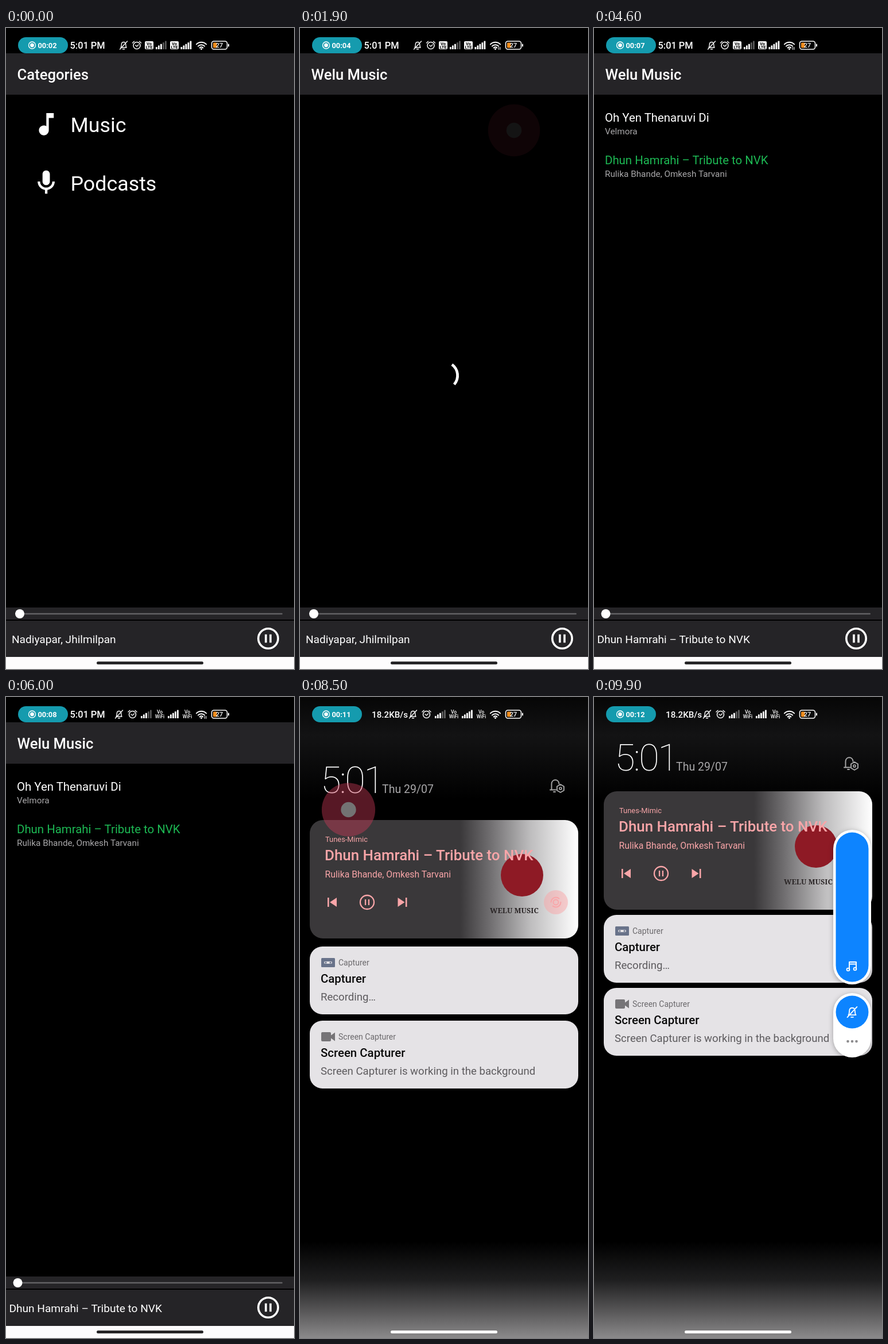
An HTML page that plays this animation: 502x1115 px, repeating every 10000 ms.

```html
<!DOCTYPE html>
<html lang="en">
<head>
<meta charset="utf-8">
<title>Music player</title>
<style>
  html, body { margin: 0; width: 100%; height: 100%; overflow: hidden; background: #000; }
  svg { display: block; width: 502px; height: 1115px; font-family: Roboto, sans-serif; fill: #fff; }
  .line { fill: none; stroke: #fff; stroke-linecap: round; stroke-linejoin: round; }
  .medium { font-weight: 500; }
  .bar { fill: #252427; }
  .title { font-size: 20.4px; }
  .sub { font-size: 15.3px; fill: #a9a8aa; }
  .pink { fill: #f9a5a8; }
  .pink .line { stroke: #f9a5a8; }
  .small { font-size: 14px; fill: #6b696c; }
  .body { font-size: 18.6px; fill: #5d5b5e; }
  #volume { filter: drop-shadow(0 2px 4px rgba(0, 0, 0, .3)); }
</style>
</head>
<body>
<svg id="stage" viewBox="0 0 502 1115"></svg>
<script>
const LOOP = 10000, STEP = 100;
const SONG = 'Dhun Hamrahi – Tribute to NVK';
const ARTISTS = 'Rulika Bhande, Omkesh Tarvani';
const LABEL = 'Welu Music';

// Markup helpers
const text = (x, y, str, attrs = '') => `<text x="${x}" y="${y}" ${attrs}>${str}</text>`;
const rect = (x, y, w, h, attrs = '') => `<rect x="${x}" y="${y}" width="${w}" height="${h}" ${attrs}/>`;
const dot = (x, y, r, attrs = '') => `<circle cx="${x}" cy="${y}" r="${r}" ${attrs}/>`;
const line = (d, width, attrs = '') => `<path class="line" d="${d}" stroke-width="${width}" ${attrs}/>`;
const group = (id, inner, attrs = '') => `<g id="${id}" ${attrs}>${inner}</g>`;
const at = (x, y, inner, scale = 1) => `<g transform="translate(${x} ${y}) scale(${scale})">${inner}</g>`;

// Icons, centred on their own origin
const BELL = 'M-5 4H5C3.6 2.6 4 0 3.6-2.5C3-6.6-3-6.6-3.6-2.5C-4 0-3.6 2.6-5 4M-1.5 6.8H1.5';
const bellOff = line(BELL + 'M-6.5 7L6.5-7', 1.4);
const alarm = dot(0, 0.5, 6, 'class="line" stroke-width="1.5"') +
  line('M-2.5 0L0 2L3-1M-7.5-4L-4.5-6.8M7.5-4L4.5-6.8', 1.4);
const signal = lit => [0, 1, 2, 3, 4].map(i =>
  rect(i * 4, 9 - i * 2.6, 2.8, 4 + i * 2.6, i < lit ? '' : 'opacity=".35"')).join('');
const volte = rect(0, 0, 15, 14, 'rx="2"') +
  `<g fill="#000" font-size="7.5" font-weight="700" text-anchor="middle">${text(7.5, 6.8, 'Vo')}${text(7.5, 13, 'LTE')}</g>`;
const vowifi = `<g font-size="8.5" class="medium" text-anchor="middle">${text(9, 6, 'Vo')}${text(9, 14, 'WiFi')}</g>`;
const wifi = line('M-8.6-8.6A12.2 12.2 0 0 1 8.6-8.6M-5.6-5.4A8 8 0 0 1 5.6-5.4M-2.8-2.5A4 4 0 0 1 2.8-2.5', 2) + dot(0, -0.6, 1.5);
const pause = (r, w) => dot(0, 0, r, `class="line" stroke-width="${w}"`) +
  rect(-r * .34, -r * .42, w, r * .84) + rect(r * .34 - w, -r * .42, w, r * .84);
const skip = '<path d="M-8-8h2.6V8H-8zM8-8V8L-4 0z"/>';

const NOTE = 'M12 3v10.55c-.59-.34-1.27-.55-2-.55-2.21 0-4 1.79-4 4s1.79 4 4 4 4-1.79 4-4V7h4V3z';
const MIC = 'M12 14c1.66 0 3-1.34 3-3V5c0-1.66-1.34-3-3-3S9 3.34 9 5v6c0 1.66 1.34 3 3 3zm5-3c0 2.76-2.24 5-5 5s-5-2.24-5-5H5c0 3.53 2.61 6.43 6 6.92V21h2v-3.08c3.39-.49 6-3.39 6-6.92h-2z';

const songRow = (y, title, artist, id) =>
  text(19, y, title, `class="title" id="${id}"`) + text(19, y + 22, artist, 'class="sub"');

const app =
  rect(0, 0, 502, 1115, 'fill="#000"') + rect(0, 44, 502, 72, 'class="bar"') +
  text(19.6, 90, '', 'id="heading" class="medium" font-size="25.6"') +
  group('categories',
    at(44.5, 141.5, `<path d="${NOTE}"/>`, 2.15) + text(112.5, 181, 'Music') +
    at(44.5, 243.5, `<path d="${MIC}"/>`, 2.13) + text(112.5, 283, 'Podcasts'), 'font-size="35.8"') +
  group('labels', text(19.6, 181, LABEL), 'font-size="35.8"') +
  group('songs', songRow(163, 'Oh Yen Thenaruvi Di', 'Velmora', 'first') + songRow(237, SONG, ARTISTS, 'second')) +
  '<path id="spinner" class="line" style="stroke-linecap:butt" stroke-width="4.8"/>' +
  rect(0, 1008, 502, 21, 'class="bar"') + rect(0, 1031, 502, 63, 'class="bar"') +
  rect(24, 1017.7, 458, 2.6, 'rx="1.3" fill="#626164"') + dot(24, 1019, 8, 'id="knob"') +
  text(0, 1070, '', 'id="playing" font-size="19.1"') + at(457, 1062, pause(17.2, 3.6)) +
  rect(0, 1094, 502, 21, 'fill="#fdfcfd"');

const mediaCard =
  rect(17, 0, 468, 206, 'rx="23" fill="url(#cover)"') +
  dot(387, 96, 37, 'fill="#8e1a25"') +
  text(331, 162, LABEL.toUpperCase(), 'fill="#2b2627" font-family="Noto Serif, serif" font-weight="600" font-size="12.6"') +
  `<g class="pink">${dot(446, 143, 21, 'opacity=".5"')}
    ${dot(446, 143, 8.5, 'class="line" stroke-width="2" stroke-dasharray="19 7.7"')}
    ${dot(446, 143, 4.5, 'class="line" stroke-width="1.8"')}
    ${text(44, 38, 'Tunes-Mimic', 'font-size="12.9"')}
    ${text(43, 70, SONG, 'class="medium" font-size="25.9"')}
    ${text(43.5, 100, ARTISTS, 'font-size="15.8"')}
    ${at(56, 143, skip)}${at(117, 143, pause(12, 2.3))}${at(178.5, 143, `<g transform="scale(-1 1)">${skip}</g>`)}</g>`;

const noticeCard = (icon, name, body) =>
  rect(17, 0, 468, 118, 'rx="22" fill="#e5e3e6"') + icon +
  text(67, 33, name, 'class="small"') +
  text(36, 63, name, 'class="title medium" style="fill:#0a0a0a"') + text(36, 94, body, 'class="body"');
const cassette = rect(37, 20, 24, 16, 'rx="1.5" fill="#69738a"') +
  '<path d="M44 28h10" stroke="#e5e3e6" stroke-width="4" stroke-linecap="round"/>' +
  dot(45, 28, 1.6, 'fill="#69738a"') + dot(53, 28, 1.6, 'fill="#69738a"');
const camera = '<path fill="#767477" d="M39 20h13q2 0 2 2v3.5l7-5v15l-7-5v3.5q0 2-2 2h-13q-2 0-2-2v-12q0-2 2-2z"/>';

const shadeHeader =
  text(36, 0, '5:01', 'font-size="65" font-weight="200" letter-spacing="-2.5"') +
  text(143, 0, 'Thu 29/07', 'font-size="19.5" fill="#a9a8aa"') +
  `<g opacity=".65">${at(445, -13, line('M-9 7.5H1M-6.5 7.5V-3C-6-12 6-12 6.5-3M-3 11H0', 1.9))}
   ${at(454, -8, line('M0-7L6-3.5V3.5L0 7L-6 3.5V-3.5Z', 1.9) + dot(0, 0, 2, 'class="line" stroke-width="1.7"'))}</g>`;

const volume =
  rect(417, 231, 66, 269, 'rx="33"') + rect(421.5, 235.5, 57, 260, 'rx="28.5" fill="#0d84ff"') +
  at(450, 468, line('M-5 6V-7H7V4.5M-5-3.5H7', 1.9) +
    dot(-7, 6, 2.4, 'class="line" stroke-width="1.8"') + dot(5, 5, 2.4, 'class="line" stroke-width="1.8"')) +
  rect(417, 515, 66, 112, 'rx="33"') + dot(450, 548, 28.5, 'fill="#0d84ff"') + at(450, 548, bellOff, 1.3) +
  [442.5, 450, 457.5].map(x => dot(x, 599, 2.3, 'fill="#8d8c8e"')).join('');

const status =
  rect(21, 16, 87, 28, 'rx="14" fill="#159bae"') +
  dot(45.5, 30, 6, 'class="line" stroke-width="1.4"') + dot(45.5, 30, 3.4) +
  text(55.5, 34.7, '', 'id="timer" font-weight="700" font-size="12.8"') +
  text(111.5, 35.7, '5:01 PM', 'id="clock" class="medium" font-size="16.4"') +
  text(125, 35.5, '18.2KB/s', 'id="speed" class="medium" font-size="15.2"') +
  group('lte', at(205, 30, bellOff) + at(228, 30, alarm) + at(242, 23, volte) +
    at(261, 24, signal(3)) + at(286, 23, volte) + at(304.5, 24, signal(5))) +
  group('calling', at(197, 30, bellOff) + at(220.5, 30, alarm) + at(235, 24, signal(3)) +
    at(259, 23, vowifi) + at(282, 24, signal(5)) + at(307, 23, vowifi)) +
  at(340.5, 37, wifi) + line('M346.5 33.5v4M349 33.5v4', 1, 'id="traffic"') +
  rect(358.5, 23, 27, 14, 'rx="4" class="line" stroke-width="1.6"') + rect(387, 27.5, 2, 5, 'rx="1"') +
  rect(361, 25.5, 6.5, 9, 'rx="1" fill="#f08c1c"') +
  text(371.8, 34, '27', 'class="medium" font-size="11.3" text-anchor="middle"');

document.getElementById('stage').innerHTML = `
  <defs>
    <linearGradient id="cover">
      <stop offset=".56" stop-color="#3a383a"/><stop offset=".67" stop-color="#6f6d6f"/>
      <stop offset=".82" stop-color="#bdbcbd"/><stop offset="1" stop-color="#fff"/>
    </linearGradient>
    <linearGradient id="dusk" x2="0" y2="1">
      <stop offset="0" stop-color="#060606"/><stop offset=".06" stop-color="#131314"/>
      <stop offset=".16" stop-color="#000"/><stop offset=".85" stop-color="#000"/>
      <stop offset=".91" stop-color="#1f1f20"/><stop offset=".96" stop-color="#5a595a"/>
      <stop offset="1" stop-color="#8b8a8b"/>
    </linearGradient>
  </defs>` +
  app + group('shade', rect(0, 0, 502, 1115, 'fill="url(#dusk)"')) +
  rect(158, 1102, 186, 5, 'rx="2.5" id="handle"') +
  group('header', shadeHeader) + group('media', mediaCard) +
  group('notice', noticeCard(cassette, 'Capturer', 'Recording…')) +
  group('capture', noticeCard(camera, 'Screen Capturer', 'Screen Capturer is working in the background')) +
  group('volume', volume) + group('status', status) +
  group('touch', '<circle id="halo" fill="#cb3a57" opacity=".95"/>' + dot(0, 0, 13.2));

const el = {};
document.querySelectorAll('[id]').forEach(node => el[node.id] = node);
const set = (id, attrs) => Object.entries(attrs).forEach(([k, v]) => el[id].setAttribute(k, v));
const fade = (id, opacity) => set(id, { opacity, display: opacity > 0 ? 'inline' : 'none' });
const write = (id, str) => { if (el[id].textContent !== str) el[id].textContent = str; };

// Linear interpolation in a list of [time, value]
function track(t, keys) {
  const i = keys.findIndex(k => k[0] > t);
  if (i < 0) return keys[keys.length - 1][1];
  if (i === 0) return keys[0][1];
  const [t0, v0] = keys[i - 1], [t1, v1] = keys[i];
  return v0 + (v1 - v0) * (t - t0) / (t1 - t0);
}

const TAPS = [
  { down: 100, up: 300, x: 367, y: 172 },
  { down: 1250, up: 1440, x: 373, y: 178 },
  { down: 3200, up: 3300, x: 266, y: 235 },
  { down: 7700, up: 8225,
    x: [[7700, 58], [7900, 62], [8100, 68], [8300, 79], [8500, 84.5]],
    y: [[7700, 22], [7900, 38], [8100, 79], [8300, 155], [8500, 196]] }
];
const times = [7800, 8100, 8300, 8500, 8600, 8700, 8800];
const keys = values => values.map((v, i) => [times[i], v]);
const CARD_TOPS = {
  media: keys([180, 191, 204, 214, 178, 169, 164]),
  notice: keys([400, 398, 420, 434, 394, 384, 379]),
  capture: keys([535, 525, 550, 563, 522, 511, 506])
};
const HEADER_Y = keys([112, 130, 152, 167, 139, 132, 128]);

function place(id, y, scale, opacity) {
  fade(id, opacity);
  set(id, { transform: `translate(${251 * (1 - scale)} ${y}) scale(${scale})` });
}

function drawSpinner(t) {
  const visible = (t >= 400 && t < 900) || (t >= 1500 && t < 2100);
  fade('spinner', visible ? 1 : 0);
  const phase = (t - 1900) / 1333 * 2 * Math.PI;
  const sweep = 145 - 125 * Math.cos(phase + 1.16);
  const start = -54 + (t - 1900) * .3;
  const point = deg => {
    const a = deg * Math.PI / 180;
    return `${251 + 23.6 * Math.cos(a)} ${604.5 + 23.6 * Math.sin(a)}`;
  };
  set('spinner', { d: `M${point(start)}A23.6 23.6 0 ${sweep > 180 ? 1 : 0} 1 ${point(start + sweep)}` });
}

function drawTouch(t) {
  const tap = TAPS.find(p => t >= p.down && t < p.up + 500);
  if (!tap) return fade('touch', 0);
  const alpha = Math.min(1, 1 - (t - tap.up) / 500);
  const pos = v => Array.isArray(v) ? track(t, v) : v;
  fade('touch', alpha);
  set('touch', { transform: `translate(${pos(tap.x)} ${pos(tap.y)})` });
  set('halo', { r: 45 + 3.6 * alpha });
}

function drawApp(t) {
  const chosen = t >= 3300;
  write('heading', t < 400 ? 'Categories' : t < 1500 ? 'Music' : LABEL);
  fade('categories', t < 400 ? 1 : 0);
  fade('labels', t >= 900 && t < 1500 ? 1 : 0);
  fade('songs', t >= 2100 ? 1 : 0);
  set('second', { fill: chosen ? '#1db954' : '#fff' });
  write('playing', chosen ? SONG : 'Nadiyapar, Jhilmilpan');
  set('playing', { x: chosen ? 5.5 : 10 });
  set('knob', { cx: t < 3600 ? 24 : 20.5 });
}

function drawShade(t) {
  fade('shade', track(t, [[7700, 0], [8050, 1]]));
  set('handle', { fill: t >= 8250 ? '#fff' : t >= 7900 ? '#161616' : '#262527' });
  place('header', track(t, HEADER_Y), track(t, [[7800, .8], [8100, .87], [8300, 1]]),
    track(t, [[7900, 0], [8100, .45], [8300, 1]]));
  const scale = track(t, [[7800, .78], [8100, .812], [8300, .95], [8500, 1]]);
  for (const id in CARD_TOPS) {
    const faint = id === 'media' ? .1 : .05;
    place(id, track(t, CARD_TOPS[id]), scale, track(t, [[8000, 0], [8100, faint], [8400, 1]]));
  }
  fade('volume', track(t, [[9300, 0], [9500, 1]]));
  set('volume', { transform: `translate(${track(t, [[9300, 8], [9500, 0]])} 0)` });
}

function drawStatus(t) {
  write('timer', '00:' + String(Math.floor((t + 2700) / 1000)).padStart(2, '0'));
  fade('clock', t >= 8250 ? 0 : track(t, [[7800, 1], [8100, .2]]));
  fade('speed', track(t, [[8200, 0], [8400, 1]]));
  fade('lte', t < 5700 ? 1 : 0);
  fade('calling', t < 5700 ? 0 : 1);
  fade('traffic', t >= 300 && t < 8300 ? 1 : 0);
}

const begin = performance.now();
function frame() {
  const elapsed = (performance.now() - begin) % LOOP;
  const t = Math.floor(elapsed / STEP) * STEP;
  drawApp(t);
  drawSpinner(t);
  drawShade(t);
  drawStatus(t);
  drawTouch(t);
  requestAnimationFrame(frame);
}
frame();
</script>
</body>
</html>
```
